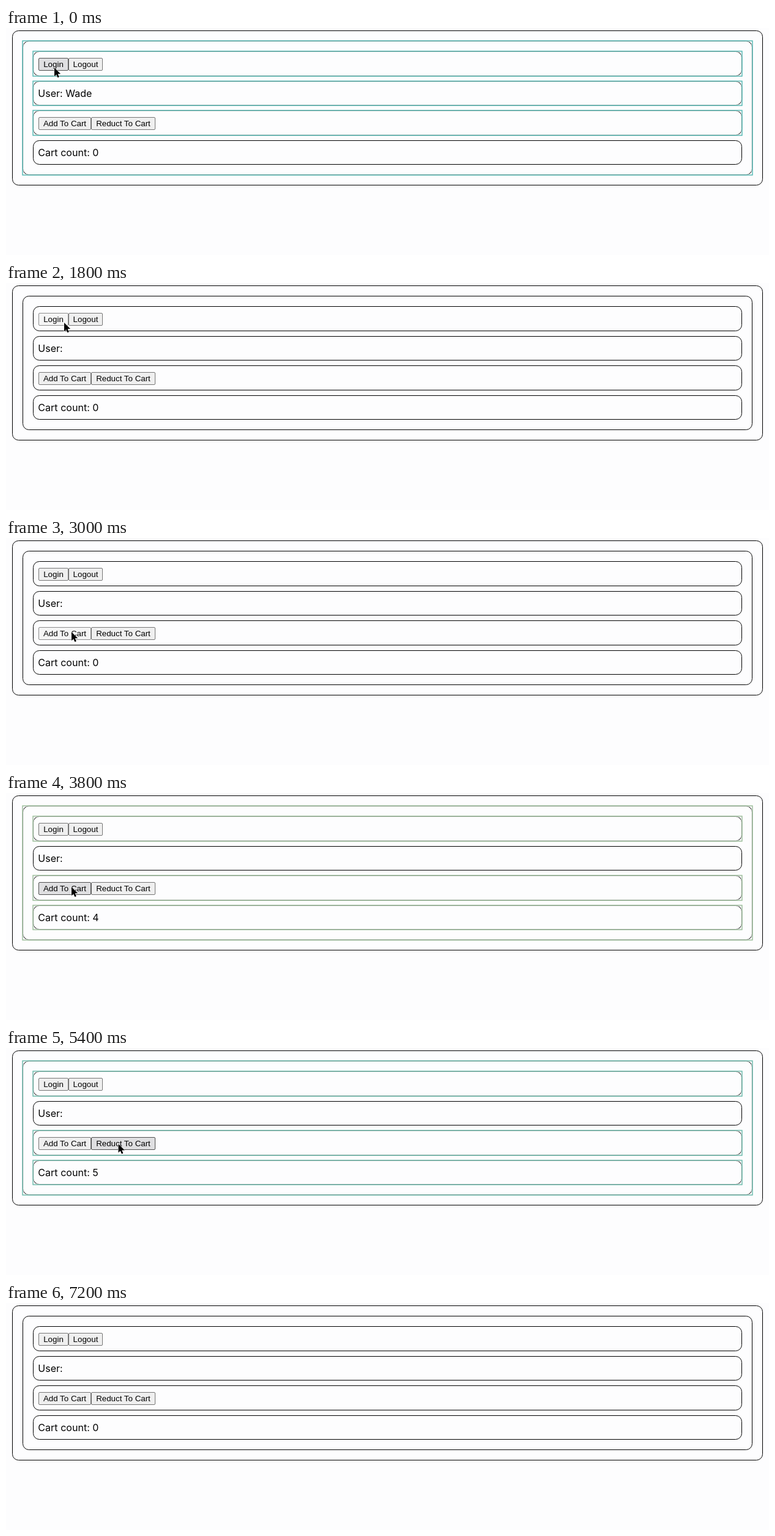
An HTML page for the animation above (8 s loop, 1246x372 px).

```html
<!DOCTYPE html>
<html lang="en">
<head>
<meta charset="utf-8">
<title>Login and cart demo</title>
<style>
  html, body { margin: 0; width: 100%; height: 100%; overflow: hidden; background: #fdfdfe; }
  svg { display: block; width: 1246px; height: 372px; }
  .box { fill: none; stroke: #000; }
  .label { font: 16px Inter, "Noto Sans", sans-serif; letter-spacing: .03px; white-space: pre; }
  .button rect { fill: #efefef; stroke: #767676; }
  .button.hover rect { fill: #dfdfe1; stroke: #4f4f4f; }
  .button.down rect { fill: #f5f5f5; stroke: #8d8d8d; }
  .button text { font: 13.333px "Liberation Sans", Arial, sans-serif; }
  .flash rect { fill: none; stroke-width: 1.2; }
  .flash .inner { stroke: #f0f0f0; stroke-width: 1; }
</style>
</head>
<body>
<svg viewBox="0 0 1246 372">
  <g id="boxes"></g>
  <g id="flashes"></g>
  <text id="user" class="label" x="52.3" y="113"></text>
  <text id="count" class="label" x="52.3" y="210"></text>
  <g id="buttons"></g>
  <path id="cursor" d="M0 0V14.2L3.2 11.2 5.4 16.2 7.8 15.2 5.7 10.3H10.2Z"
        fill="#000" stroke="#fff" stroke-width="1" paint-order="stroke"/>
</svg>
<script>
const LOOP = 8000, STEP = 100, FLASH = 250, PRESS = 100;
const $ = id => document.getElementById(id);

function add(parent, tag, attrs) {
  const el = document.createElementNS('http://www.w3.org/2000/svg', tag);
  for (const name in attrs) el.setAttribute(name, attrs[name]);
  return parent.appendChild(el);
}

// Boxes: x, y, width, height
const PANEL = [27.5, 21.5, 1191, 219];
const ROWS = [[38.5, 40], [87.5, 39], [135.5, 40], [184.5, 39]]
  .map(([y, h]) => [44.5, y, 1157, h]);
const BOXES = [PANEL, ...ROWS];

for (const [x, y, width, height] of [[10.5, 4.5, 1225, 253], ...BOXES])
  add($('boxes'), 'rect', { class: 'box', x, y, width, height, rx: 10 });

// Half-pixel offsets soften the outlines so they blend with the box border
const flashes = BOXES.map(([x, y, w, h]) => {
  const g = add($('flashes'), 'g', { class: 'flash' });
  add(g, 'rect', { class: 'inner', x: x + .5, y: y + .5, width: w - 1, height: h - 1 });
  add(g, 'rect', { x: x - .5, y: y - .5, width: w + 1, height: h + 1 });
  return g;
});

const buttons = [
  ['Login', 53, 49, 49], ['Logout', 102, 49, 56],
  ['Add To Cart', 53, 146, 86], ['Reduct To Cart', 139, 146, 105]
].map(([name, x, y, w]) => {
  const el = add($('buttons'), 'g', { class: 'button' });
  add(el, 'rect', { x: x + .5, y: y + .5, width: w - 1, height: 20, rx: 1.5 });
  add(el, 'text', { x: x + w / 2, y: y + 15, 'text-anchor': 'middle' }).textContent = name;
  return { el, x, y, w };
});

const LOGIN = 0, LOGOUT = 1, ADD = 2, REDUCT = 3;
const series = (button, n, start, gap) =>
  Array.from({ length: n }, (_, i) => ({ button, time: start + i * gap, heat: Math.min(i, 3) / 3 }));

const clicks = [
  ...series(LOGIN, 1, 0, 0),
  ...series(LOGOUT, 1, 900, 0),
  ...series(LOGIN, 1, 1900, 0),
  ...series(LOGOUT, 1, 2400, 0),
  ...series(ADD, 7, 3100, 210),
  ...series(REDUCT, 7, 5080, 280)
];
const LAST = clicks[clicks.length - 1].time;

// Cursor stops: time, x, y
const PATH = [
  [0, 79, 65], [300, 79, 65], [700, 127, 64], [1200, 127, 64], [1600, 95, 65],
  [1950, 95, 65], [2200, 127, 64], [2450, 127, 64], [2850, 107, 154],
  [4400, 107, 154], [4800, 183, 157], [5300, 183, 157],
  [5600, 185, 158], [LAST + 50, 185, 158], [7150, 190, 292]
];

function cursorAt(t) {
  const i = PATH.findIndex(stop => stop[0] > t);
  if (i < 0) return null;
  const [t0, x0, y0] = PATH[i - 1], [t1, x1, y1] = PATH[i];
  const k = (t - t0) / (t1 - t0), e = k * k * (3 - 2 * k);
  return { x: x0 + (x1 - x0) * e, y: y0 + (y1 - y0) * e };
}

function mix(a, b, k) {
  return `rgb(${a.map((v, i) => Math.round(v + (b[i] - v) * k))})`;
}

function draw(t) {
  const done = clicks.filter(c => c.time <= t);
  const last = done[done.length - 1];
  const total = button => done.filter(c => c.button === button).length;

  $('user').textContent = total(LOGIN) > total(LOGOUT) ? 'User: Wade' : 'User:';
  $('count').textContent = 'Cart count: ' + (total(ADD) - total(REDUCT));

  const active = t - last.time < FLASH;
  const still = last.button < ADD ? 4 : 2;
  const color = mix([55, 175, 169], [140, 180, 138], last.heat);
  flashes.forEach((g, i) => {
    g.setAttribute('visibility', active && i !== still ? 'visible' : 'hidden');
    g.setAttribute('stroke', color);
  });

  const p = cursorAt(t);
  $('cursor').setAttribute('visibility', p ? 'visible' : 'hidden');
  if (p) $('cursor').setAttribute('transform', `translate(${p.x} ${p.y})`);

  buttons.forEach(({ el, x, y, w }, i) => {
    const hover = p && p.x >= x && p.x < x + w && p.y >= y && p.y < y + 21;
    const down = clicks.some(c => c.button === i && t >= c.time - PRESS && t < c.time);
    el.setAttribute('class', 'button' + (down ? ' down' : hover ? ' hover' : ''));
  });
}

const start = performance.now();
function tick() {
  const t = (performance.now() - start) % LOOP;
  draw(Math.floor(t / STEP) * STEP);
  requestAnimationFrame(tick);
}
tick();
</script>
</body>
</html>
```
